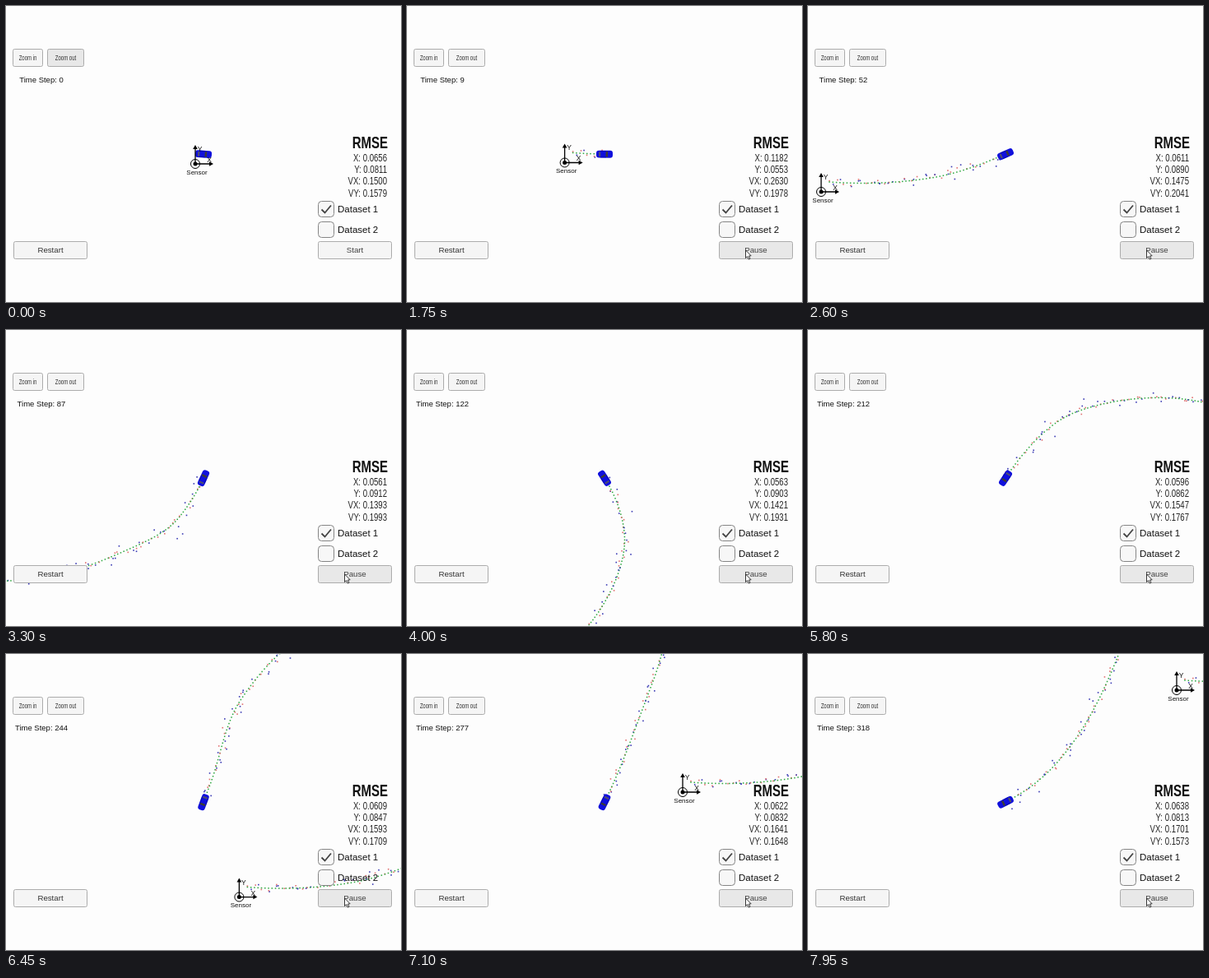
An HTML page with a canvas for the animation above (8 s loop, 480 by 360 pixels).

```html
<!DOCTYPE html>
<html lang="en">
<head>
<meta charset="utf-8">
<title>Tracking simulator</title>
<style>
  html, body { margin: 0; width: 100%; height: 100%; overflow: hidden; background: #fdfdfd; }
  canvas { display: block; }
</style>
</head>
<body>
<canvas id="stage" width="480" height="360"></canvas>
<script>
const ctx = document.getElementById('stage').getContext('2d');
const LOOP = 8000, TICK = 50, START = 1500, LAST_STEP = 318;
const CAR = { x: 240, y: 180 };

// Key points of the drive: time step, x, y in pixels from the sensor
const ROUTE = [
  [0, 10, -12], [29.5, 134, -17], [52, 224, -46], [72.5, 294, -88], [99.4, 338, -183],
  [122, 314, -268], [145.4, 242, -332], [184, 87, -320], [212, 2, -240],
  [239, -36, -135], [277, -95, 12], [300, -148, 91], [318, -208, 136]
];

// Error readouts: value before the run, then at time steps 9, 122 and 318
const ERRORS = {
  X: { idle: .0656, early: .1182, mid: .0561, late: .0638 },
  Y: { idle: .0811, early: .0553, mid: .0904, late: .0813 },
  VX: { idle: .1500, early: .2630, mid: .1416, late: .1701 },
  VY: { idle: .1579, early: .1978, mid: .1932, late: .1573 }
};

const clamp = (v, lo, hi) => Math.min(hi, Math.max(lo, v));

function slope(i, axis) {
  const last = ROUTE.length - 1;
  const between = (a, b) => (ROUTE[b][axis] - ROUTE[a][axis]) / (ROUTE[b][0] - ROUTE[a][0]);
  if (i === 0) return 2 * between(0, 1) - between(0, 2);
  if (i === last) return 2 * between(last - 1, last) - between(last - 2, last);
  return between(i - 1, i + 1);
}

// Cubic Hermite curve through the key points
function position(step) {
  let i = 0;
  while (i < ROUTE.length - 2 && ROUTE[i + 1][0] <= step) i++;
  const a = ROUTE[i], b = ROUTE[i + 1], span = b[0] - a[0], u = (step - a[0]) / span;
  const at = axis =>
    (1 + 2 * u) * (1 - u) ** 2 * a[axis] + u * (1 - u) ** 2 * span * slope(i, axis) +
    u * u * (3 - 2 * u) * b[axis] + u * u * (u - 1) * span * slope(i + 1, axis);
  return { x: at(1), y: at(2) };
}

function heading(step) {
  const a = position(Math.max(step - .5, 0)), b = position(Math.min(step + .5, LAST_STEP));
  return Math.atan2(b.y - a.y, b.x - a.x);
}

// Fast settling from the early value onto a slow drift
function errorValue({ idle, early, mid, late }, step) {
  if (step === 0) return idle;
  const drift = s => mid + (late - mid) * (s - 122) / (LAST_STEP - 122);
  return drift(step) + (early - drift(9)) * Math.exp((9 - step) / 20);
}

function random(seed) {
  const v = Math.sin(seed * 127.1 + 11.7) * 43758.5453;
  return v - Math.floor(v);
}
const gauss = seed =>
  (random(seed) + random(seed + .31) + random(seed + .62) + random(seed + .87) - 2) * 1.73;

// Laser readings scatter evenly, radar readings mostly across the line of sight
const trail = Array.from({ length: LAST_STEP }, (_, k) => {
  const p = position(k), radar = k % 2 === 1;
  const dist = Math.hypot(p.x, p.y), angle = Math.atan2(p.y, p.x);
  const along = gauss(k + 1) * (radar ? 4 : 2.6);
  const across = gauss(k + 500) * (radar ? 2 + dist * .016 : 2.6);
  return {
    x: p.x, y: p.y, radar,
    mx: p.x + along * Math.cos(angle) - across * Math.sin(angle),
    my: p.y + along * Math.sin(angle) + across * Math.cos(angle)
  };
});

function text(str, x, y, size, { align = 'center', color = '#111', weight = '', narrow = 1 } = {}) {
  ctx.save();
  ctx.translate(x, y);
  ctx.scale(narrow, 1);
  ctx.font = `${weight} ${size}px "Liberation Sans", Arial, sans-serif`;
  ctx.textAlign = align;
  ctx.fillStyle = color;
  ctx.fillText(str, 0, 0);
  ctx.restore();
}

function box(x, y, w, h, radius, fill, border) {
  ctx.beginPath();
  ctx.roundRect(x + .5, y + .5, w, h, radius);
  ctx.fillStyle = fill;
  ctx.fill();
  ctx.strokeStyle = border;
  ctx.lineWidth = 1;
  ctx.stroke();
}

function polygon(points, fill) {
  ctx.beginPath();
  points.forEach(([x, y]) => ctx.lineTo(x, y));
  ctx.closePath();
  ctx.fillStyle = fill;
  ctx.fill();
}

function button(label, x, y, w, active, size, style) {
  box(x, y, w, 21, 2, active ? '#e8e8e8' : '#f5f5f5', '#acacac');
  text(label, x + w / 2 + .5, y + 14.3, size, style);
}

function dot(x, y, size, color) {
  ctx.fillStyle = color;
  ctx.fillRect(x - size / 2, y - size / 2, size, size);
}

function drawTrail(step) {
  for (const p of trail.slice(0, step)) {
    dot(p.mx, p.my, 1.6, p.radar ? '#3a3ab4' : '#e07070');
    dot(p.x, p.y, 1.5, '#2aa63c');
  }
}

function drawSensor() {
  ctx.strokeStyle = '#000';
  ctx.lineWidth = 1.3;
  ctx.beginPath();
  ctx.moveTo(0, -19);
  ctx.lineTo(0, 0);
  ctx.lineTo(18, 0);
  ctx.stroke();
  polygon([[0, -23], [-2.8, -18], [2.8, -18]], '#000');
  polygon([[22, 0], [17, -2.8], [17, 2.8]], '#000');
  ctx.lineWidth = 1;
  ctx.beginPath();
  ctx.arc(0, 0, 5.5, 0, 7);
  ctx.stroke();
  ctx.beginPath();
  ctx.arc(0, 0, 2.5, 0, 7);
  ctx.fill();
  text('Y', 5.5, -15, 8.5);
  text('X', 17, -2, 8.5);
  text('Sensor', 2, 12.5, 8);
}

function drawCar(angle) {
  ctx.save();
  ctx.translate(CAR.x, CAR.y + .2);
  ctx.rotate(angle);
  ctx.beginPath();
  ctx.roundRect(-10, -4.4, 20, 8.8, 3.2);
  ctx.fillStyle = '#1010dc';
  ctx.fill();
  ctx.fillStyle = '#0808a8';
  ctx.fillRect(-5, -4, 7, .8);
  ctx.fillRect(-5, 3.2, 7, .8);
  ctx.fillStyle = '#50506c';
  ctx.fillRect(-6.8, -2.8, 2, 5.6);
  polygon([[1.6, -2.8], [4, -3.5], [4, 3.5], [1.6, 2.8]], '#3c3c34');
  ctx.restore();
}

function drawErrors(step) {
  text('RMSE', 442.3, 173, 20, { weight: 'bold', narrow: .75 });
  Object.entries(ERRORS).forEach(([name, keys], n) =>
    text(`${name}: ${errorValue(keys, step).toFixed(4)}`, 463, 188.6 + 14.3 * n, 12,
      { align: 'right', color: '#262626', narrow: .8 }));
}

function drawCheckbox(label, y, checked) {
  box(379, y, 19, 19, 4, '#f7f7f7', '#858585');
  text(label, 403, y + 13.6, 11.5, { align: 'left' });
  if (!checked) return;
  ctx.beginPath();
  ctx.moveTo(383.5, y + 10.5);
  ctx.lineTo(387.5, y + 14.5);
  ctx.lineTo(395, y + 5.5);
  ctx.strokeStyle = '#444';
  ctx.lineWidth = 1.8;
  ctx.stroke();
}

function drawCursor(time) {
  const left = (1 - clamp((time - 550) / 500, 0, 1)) ** 2;
  ctx.save();
  ctx.translate(411.5 + 9 * left, 297 + 45 * left);
  polygon([[0, 0], [0, 9.5], [2.2, 7.6], [3.8, 11.2], [5.4, 10.4], [3.9, 7], [6.6, 6.8]], '#fff');
  ctx.strokeStyle = '#222';
  ctx.lineWidth = .9;
  ctx.stroke();
  ctx.restore();
}

function inWorld(origin, paint) {
  ctx.save();
  ctx.translate(CAR.x - origin.x, CAR.y - origin.y);
  paint();
  ctx.restore();
}

function draw(time) {
  const step = clamp(Math.ceil((time - START - 70) / 20), 0, LAST_STEP);
  const running = time >= START, car = position(step);
  ctx.fillStyle = '#fdfdfd';
  ctx.fillRect(0, 0, 480, 360);

  inWorld(car, () => drawTrail(step));
  drawCar(heading(step));
  inWorld(car, drawSensor);

  const small = { narrow: .69, color: '#333' };
  button('Zoom in', 8, 52, 36, false, 8.7, small);
  button('Zoom out', 50, 52, 44, !running, 8.7, small);
  text(`Time Step: ${step}`, 43, 93.3, 9.5);
  drawErrors(step);
  drawCheckbox('Dataset 1', 237, true);
  drawCheckbox('Dataset 2', 262, false);
  button('Restart', 9, 286, 89, false, 9.7, { color: '#333' });
  button(running ? 'Pause' : 'Start', 379, 286, 89, time >= 750, 9.7, { color: '#404040' });
  if (time >= 550) drawCursor(time);
}

function frame() {
  draw(Math.floor(performance.now() % LOOP / TICK) * TICK);
  requestAnimationFrame(frame);
}
frame();
</script>
</body>
</html>
```
